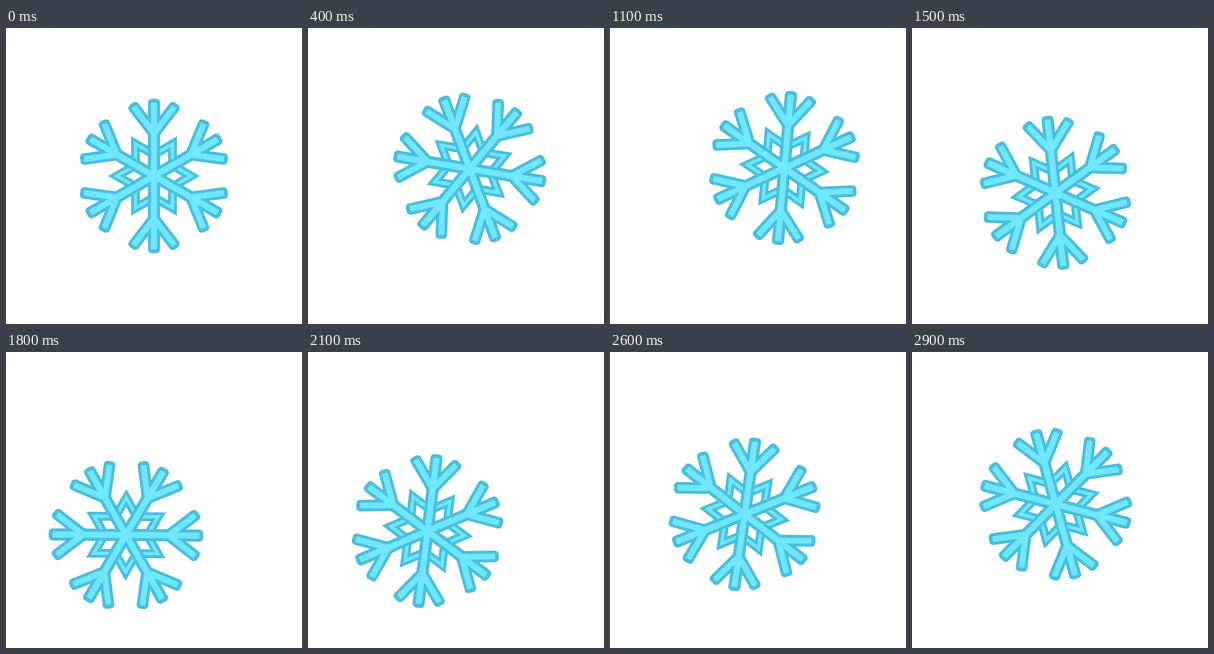
These frames come from a looping animation (520x520 px, 3 s). An HTML page:

```html
<!DOCTYPE html>
<html lang="en">
<head>
<meta charset="utf-8">
<title>Snowflake</title>
<style>
  html, body { margin: 0; width: 100%; height: 100%; overflow: hidden; background: #fff; }
  svg { display: block; width: 100vw; height: 100vh; }
  .arm.rim { fill: #3f93ab; stroke: #3f93ab; stroke-width: 1; }
  .arm.dark { fill: #46c2e1; }
  .arm.light { fill: #71e7ff; }
  .band { fill: none; stroke-miterlimit: 4; }
  .band.rim { stroke: #3f93ab; stroke-width: 15.3; }
  .band.dark { stroke: #46c2e1; stroke-width: 14.4; }
  .band.light { stroke: #71e7ff; stroke-width: 5.5; }
</style>
</head>
<body>
<svg viewBox="0 0 520 520">
  <defs>
    <path id="corner" d="M0 -37.5 L32.5 -56.3 V-18.75"/>
    <rect id="twig" x="-9.5" y="-64.5" width="19" height="69" rx="6"/>
    <rect id="vein" x="-5" y="-58.5" width="10" height="61" rx="2"/>
    <g id="edge">
      <rect x="-10" y="-135" width="20" height="140" rx="6"/>
      <use href="#twig" transform="translate(0 -75) rotate(-37.6)"/>
      <use href="#twig" transform="translate(0 -75) rotate(37.6)"/>
    </g>
    <g id="core">
      <rect x="-5.25" y="-129" width="10.5" height="132" rx="2"/>
      <use href="#vein" transform="translate(0 -75) rotate(-37.6)"/>
      <use href="#vein" transform="translate(0 -75) rotate(37.6)"/>
    </g>
  </defs>
  <g id="flake"></g>
</svg>
<script>
const NS = 'http://www.w3.org/2000/svg';
const flake = document.getElementById('flake');

function ring(shape, cls) {
  for (let i = 0; i < 6; i++) {
    const use = document.createElementNS(NS, 'use');
    use.setAttribute('href', '#' + shape);
    use.setAttribute('class', cls);
    use.setAttribute('transform', `rotate(${i * 60})`);
    flake.append(use);
  }
}
ring('corner', 'band rim');
ring('edge', 'arm rim');
ring('corner', 'band dark');
ring('corner', 'band light');
ring('edge', 'arm dark');
ring('core', 'arm light');

const STEP = 100, STEPS = 30;
const START = 0.75, TURN = 12.2;  // spin starts after START steps, degrees per step

// [step, x, y]
const path = [
  [0, 260, 260], [START, 260, 260], [9.6, 325.7, 226], [11, 306.5, 246],
  [15, 252, 289.5], [18.75, 200.5, 329.5], [21, 210, 314.5],
  [29, 252.5, 267.5], [30.25, 259.5, 260]
];

function place(s) {
  const i = path.findIndex(p => p[0] > s);
  const [s0, x0, y0] = path[i - 1], [s1, x1, y1] = path[i];
  const k = (s - s0) / (s1 - s0);
  return [x0 + (x1 - x0) * k, y0 + (y1 - y0) * k];
}

const origin = performance.now();
function draw(now) {
  const s = Math.floor(Math.max(0, now - origin) / STEP) % STEPS;
  const [x, y] = place(s);
  const angle = Math.max(0, s - START) * TURN;
  flake.setAttribute('transform', `translate(${x} ${y}) rotate(${angle})`);
  requestAnimationFrame(draw);
}
draw(origin);
</script>
</body>
</html>
```
